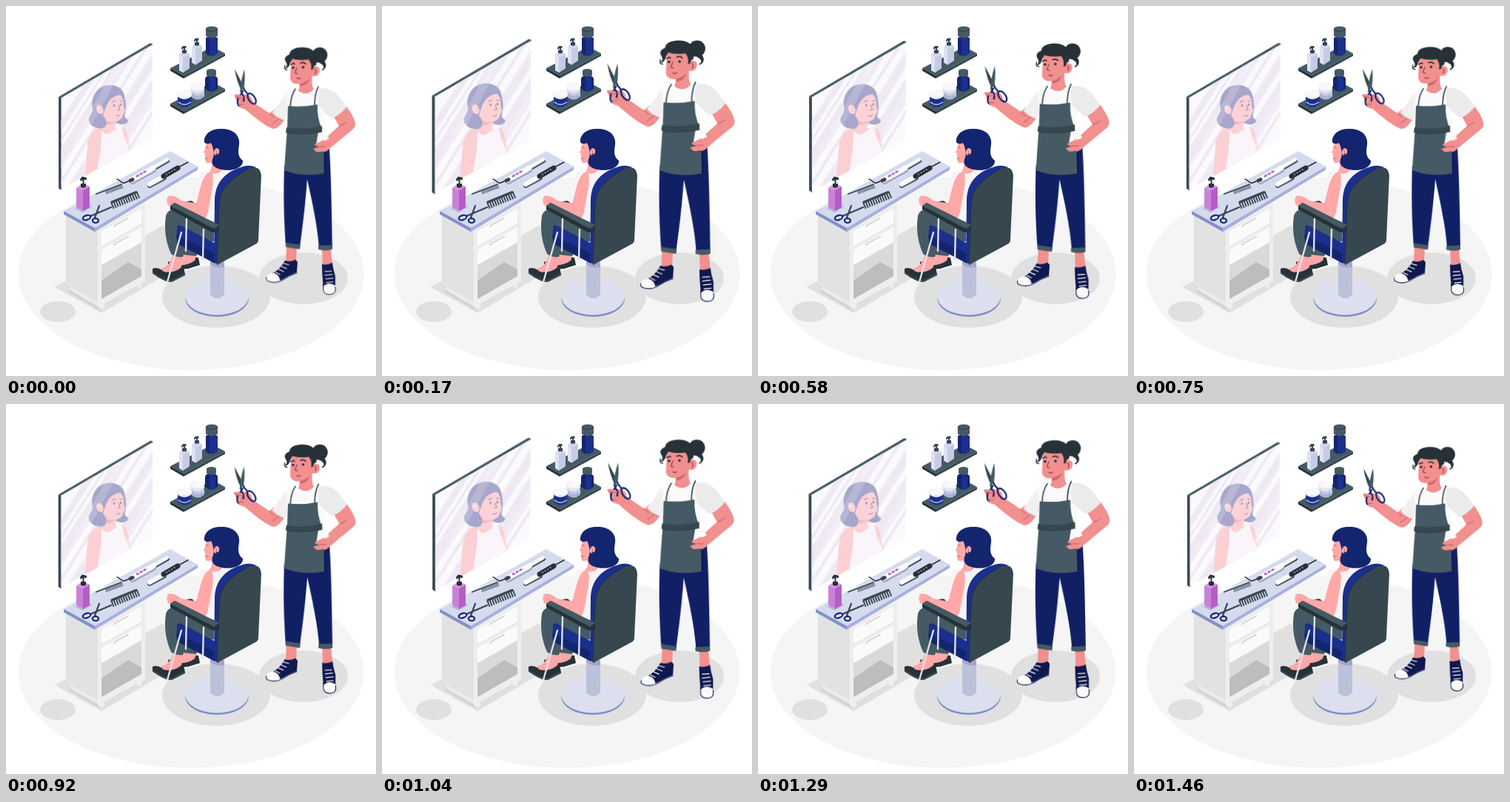
An HTML page that plays this animation: 500x500 px, repeating every 1.5 s.

```html
<!DOCTYPE html>
<html lang="en">
<head>
<meta charset="utf-8">
<title>Hair salon</title>
<style>
html, body { margin: 0; width: 100%; height: 100%; overflow: hidden; background: #fff; }
svg { display: block; width: 100vw; height: 100vh; }
.navy { fill: #14256f; }
.blue { fill: #1b2f8c; }
.slate { fill: #455a64; }
.dark { fill: #37474f; }
.ink { fill: #263238; }
.skin { fill: #f28f8f; }
.rose { fill: #ffa8a7; }
.shade { fill: #e0e0e0; }
.white { fill: #fafafa; }
.line { fill: none; stroke-linecap: round; stroke-linejoin: round; }
#stylist { transform-origin: 391px 222px; }
#mirror { transform-origin: 134.5px 149px; }
</style>
</head>
<body>
<svg viewBox="0 0 500 500">
  <defs>
    <clipPath id="glass"><path d="M74.500 124L198 52V179L74.500 248Z"/></clipPath>
    <g id="pump">
      <path d="M234 66L238 62H244L248 65V84L239 90L234 87Z" fill="#dfe2f3"/>
      <path d="M239 69L248 65V84L239 90Z" fill="#c5cae6"/>
      <path d="M234 66L238 62H244L248 65L239 69Z" fill="#d3d7ee"/>
      <path class="dark" d="M238 59.500H244V63.500Q241 65 238 63.500ZM240 56H242V60H240ZM237 56.500L239 54H243.500V57H240L237.500 59Z"/>
    </g>
    <g id="shelf">
      <path class="slate" d="M222 84L279 55L296 64L240 94Z"/>
      <path class="ink" d="M222 84L240 94V98L222 87.500Z"/>
      <path class="dark" d="M240 94L296 64V67.500L240 98Z"/>
    </g>
  </defs>

  <!-- floor and shadows -->
  <ellipse cx="250" cy="362" rx="233.500" ry="130" fill="#f5f5f5"/>
  <g class="shade">
    <ellipse cx="70" cy="413" rx="24" ry="14"/>
    <ellipse cx="284" cy="393" rx="73" ry="42"/>
    <ellipse cx="402" cy="368" rx="60" ry="35"/>
    <path d="M66 380L211 297L268 332L129 415Z"/>
  </g>

  <!-- shelves -->
  <use href="#shelf"/>
  <use href="#pump"/>
  <use href="#pump" x="17" y="-10.500"/>
  <path class="blue" d="M270 43Q278 38 286 43V64Q278 71 270 64Z"/>
  <path class="navy" d="M270 43V64Q272 67 275 67.500V43Z"/>
  <path class="slate" d="M270 31Q270 27.500 278 27.500T286 31V40.500Q278 46 270 40.500Z"/>
  <path class="line" d="M270 32Q278 37 286 32" stroke="#263238" stroke-width=".8"/>
  <use href="#shelf" y="48"/>
  <path class="navy" d="M269 98Q270 94 277.500 93Q285 94 286 98V112Q277.500 119 269 112Z"/>
  <path class="blue" d="M275 96H283V114Q279 116.500 275 115.500Z"/>
  <path class="slate" d="M271 88Q271 85 277.500 85T284 88V93.500Q277.500 98 271 93.500Z"/>
  <path d="M250 115H268V122Q259 131 250 122Z" fill="#c5cae6"/>
  <path class="line" d="M251 121Q259 127 267 121" stroke="#7c87bd" stroke-width="5" stroke-dasharray=".8 1.700" style="stroke-linecap:butt"/>
  <path d="M249 109Q249 104 258.500 104T268 109V114Q258.500 122 249 114Z" fill="#e6e6ea"/>
  <ellipse cx="258.500" cy="109" rx="9.500" ry="5" fill="#f8f8fa"/>
  <path class="blue" d="M232 122H250.500V132Q241 141 232 132Z"/>
  <path class="line" d="M233 130Q241 136.500 249.500 130" stroke="#c5cae6" stroke-width="1.500"/>
  <path d="M231 118.500Q231 113.500 241 113.500T251 118.500V122Q241 130 231 122Z" fill="#e6e6ea"/>
  <ellipse cx="241" cy="118.500" rx="10" ry="5" fill="#f8f8fa"/>

  <!-- mirror -->
  <g id="mirror">
    <path class="dark" d="M71 122.500L75 125V249L71 246.500Z"/>
    <path class="slate" d="M71 122.500L195 50L198 51V53L75 125Z"/>
    <g clip-path="url(#glass)">
      <path d="M70 120L198 46V185L70 252Z" fill="#faf9fb"/>
      <g id="rays" stroke="#efe9f4"></g>
      <path d="M126 164C116 169 111 178 110 190L106 240L128 236L131 176L157 163C164 168 166 177 167 195L162 207L154 207L150 165Z" fill="#fccfd2"/>
      <path d="M129 167L133 172C140 176 148 170 152 162L157 164C158 174 162 184 166 192L167 207L122 235C124 210 130 195 129 167Z" fill="#f9f5fa"/>
      <path d="M118 142Q115 123 125 113C137 103 156 107 160 121Q164 136 160 150L164 154Q164 160 155 160L149 157L124 163Z" fill="#a7a6cb"/>
      <path d="M129 138L132 166C138 173 147 169 148 161L149 157Q156 156 158 148L161 142L159 135Q160 124 153 119Q142 121 135 134Z" fill="#fbd3d6"/>
      <path d="M132 148C134 159 143 157 149 156C141 161 136 162 132 158Z" fill="#f5b7bf"/>
      <path d="M155 120C144 121 139 127 135 136L131 148C136 153 137 161 133 164C126 168 112 163 112 154C111 149 118 145 117 138C114 124 122 108 138 107C150 106 159 112 160 122Q158 119 155 120Z" fill="#a7a6cb"/>
      <path d="M148 157Q157 153 160 148Q161 152 165 154Q165 160 156 160Q151 160 148 157Z" fill="#a7a6cb"/>
      <ellipse cx="127" cy="140" rx="4.500" ry="6.500" fill="#fbd3d6" transform="rotate(-22 127 140)"/>
      <path class="line" d="M143 130L148 128M154 128L157 129M152 134L154 140L151 141M149 148Q152 150 154 147" stroke="#a08bae" stroke-width="1"/>
      <path d="M145 133h2v3h-2zM154 132h2v3h-2z" fill="#8d8fbd"/>
      <path d="M75 214L150 75H162L78 231ZM141 218L201 106V128L156 211Z" fill="#fff" opacity=".18"/>
    </g>
  </g>

  <!-- dressing table -->
  <path d="M81 276L125 300V402L81 376Z" fill="#e2e2e2"/>
  <path d="M85 379L89 381V386L128 408V412L85 387Z" fill="#d2d2d2"/>
  <path d="M86 379L128 402V408L86 384Z" fill="#ebebeb"/>
  <path d="M124 302L188 264V372L183 375V380L178 382V377L133 402V408L128 410L124 406Z" fill="#efefef"/>
  <path d="M129 349L183 318V365L129 396Z" fill="#d9d9d9"/>
  <path d="M129 371L165 346L183 356V365L129 396Z" fill="#bdbdbd"/>
  <g id="drawer">
    <path d="M128 304L184 272V294L128 326Z" fill="#fafafa" stroke="#e2e2e2"/>
    <path class="line" d="M146 298L147 296.500L163 287.500L165 287" stroke="#d3d3d3" stroke-width="2"/>
  </g>
  <use href="#drawer" y="25"/>
  <path d="M78 277L222 196L259 217L120 300Z" fill="#d6daed"/>
  <path d="M78 277L120 300V305L78 281.500Z" fill="#8291cc"/>
  <path d="M120 300L259 217V221.500L120 305Z" fill="#a5b0df"/>

  <!-- table tools -->
  <path d="M93 274L108 267L117 271L104 279Z" fill="#b7bdd9"/>
  <path d="M95 246L103 240L113 244V272L104 277L95 272Z" fill="#c982d6"/>
  <path d="M104 249L113 244V272L104 277Z" fill="#b75dc9"/>
  <path d="M95 246L103 240L113 244L104 249Z" fill="#d79ae0"/>
  <path class="ink" d="M101 240H108V244.500Q104.500 247 101 244.500ZM103.500 234H105.500V241H103.500ZM100 234L103 230.500L109 232V235L104 234.500L101 237Z"/>
  <g class="line">
    <path d="M114 284L142 272M120 286L126 270" stroke="#37474f" stroke-width="2.200"/>
    <ellipse cx="109" cy="286" rx="5.500" ry="3" stroke="#14256f" stroke-width="2.200" transform="rotate(-18 109 286)"/>
    <ellipse cx="121" cy="290" rx="4" ry="3" stroke="#14256f" stroke-width="2.200"/>
    <path d="M122 254L156 241" stroke="#37474f" stroke-width="1.800"/>
    <path d="M135 252L158 243.500" stroke="#455a64" stroke-width="5" stroke-dasharray="1.200 1" style="stroke-linecap:butt"/>
    <path d="M143 265L176 251.500" stroke="#37474f" stroke-width="3"/>
    <path d="M143 270L180 255" stroke="#37474f" stroke-width="9" stroke-dasharray="1.900 1.500" style="stroke-linecap:butt"/>
    <path d="M150 234C154 234 155 240 160 239C164 238 165 236 170 236" stroke="#263238" stroke-width="1.600"/>
    <path d="M171 237.500L199 222" stroke="#9aa1c2" stroke-width="7"/>
    <path d="M199 221L219 209.500" stroke="#455a64" stroke-width="4.500"/>
    <path d="M170 235L199 219" stroke="#fafafa" stroke-width="7.500"/>
    <path d="M199 218.500L218 207.500" stroke="#fafafa" stroke-width="4.500"/>
    <path d="M177 230L190 222.500" stroke="#b75dc9" stroke-width="2.600" stroke-dasharray="2 3.500"/>
    <path d="M168 236L171 234.500" stroke="#37474f" stroke-width="5"/>
    <path d="M194 243L214 232.500" stroke="#455a64" stroke-width="6"/>
    <path d="M194 241L214 230" stroke="#fafafa" stroke-width="6"/>
    <path d="M213 230L232 219" stroke="#263238" stroke-width="7"/>
    <path d="M217 227.500L228 221" stroke="#d8dcee" stroke-width="1.600" stroke-dasharray=".1 4"/>
    <path d="M233 218L246 211" stroke="#263238" stroke-width="1.600"/>
  </g>

  <!-- chair base -->
  <ellipse cx="285" cy="395" rx="43" ry="25" fill="#7f8dc8"/>
  <ellipse cx="285" cy="392.500" rx="43" ry="25" fill="#dcdfee"/>
  <path d="M276 340H295V390Q285.500 400 276 390Z" fill="#bcc1da"/>
  <path d="M276 344L295 347V353Q285 355 276 349Z" fill="#a0a7c9"/>

  <!-- client and chair -->
  <path class="ink" d="M219 346Q225 343 232 348Q241 349 247 343Q253 338 260 340L262 350L246 355Q229 357 219 350Z"/>
  <path class="rose" d="M229 347Q238 344 241 333L258 335L255 344Q246 351 233 350Z"/>
  <path class="ink" d="M198 355Q204 352 211 357Q221 361 228 354Q235 349 240 352L242 363L224 372Q216 374 209 367L198 360Z"/>
  <path class="rose" d="M209 355Q221 352 226 337L240 338L237 353Q227 362 213 359Z"/>
  <path class="dark" d="M198 359L211 367Q218 371 224 370L242 361V364L224 373Q215 374 198 361.500Z"/>
  <path class="dark" d="M222 269L250 263L275 276L270 294L240 290Z"/>
  <path d="M262 226Q270 221 282 222L309 219L287 295L250 280Z" fill="#f7f4f6"/>
  <path class="slate" d="M216 284Q218 274 232 274L281 292V318L256 324Q260 333 257 338L240 336L239 339Q229 340 223 335C217 321 213 304 216 284Z"/>
  <path class="blue" d="M231 298Q232 295 237 297L283 321V348L235 323Q230 320 230 315Z"/>
  <path class="navy" d="M230 309L283 335V348L235 323Q230 320 230 315Z"/>
  <path class="slate" d="M217 283Q220 276 234 275L270 292L268 303L238 293Q230 292 231 302Q229 316 233 326L222 322Q215 305 217 283Z"/>
  <path class="blue" d="M281 345L282 262C283 238 296 224 320 217Q329 214 338 218L291 255L287 350Z"/>
  <path class="dark" d="M285 350L288 268C290 246 302 235 325 222Q343 212 345 229L341 316Q341 320 337 322Z"/>
  <path class="line" d="M285 348L288 268C290 246 302 235 325 222" stroke="#263238" stroke-width="1"/>
  <path class="rose" d="M279 207L292 216Q293 224 286 226Q279 228 275 224Q280 217 277 211Z"/>
  <path class="rose" d="M277 224C269 225 265 236 262 248L257 267L237 263Q226 254 219 257Q216 262 219 269L225 271L255 286C266 292 271 288 273 278L279 246Q281 227 277 224Z"/>
  <path class="line" d="M258 267L254 266M223 264L231 268" stroke="#e98080" stroke-width=".8"/>
  <path class="rose" d="M271 184Q270 192 267 198L269 200Q268 209 271 212Q277 213 284 209L290 195L285 181Z"/>
  <path class="navy" d="M268 184C267 172 279 165 292 166C308 166 317 176 315 188C313 199 314 204 320 209C321 219 305 224 291 221C281 219 277 214 279 207Q282 202 280 194Q279 188 277 185Q271 188 268 184Z"/>
  <ellipse class="rose" cx="284.500" cy="197" rx="3.600" ry="5" transform="rotate(15 284.500 197)"/>
  <path class="line" d="M283 195Q286 196 284 200M270 191L273 191M270 206L273 206" stroke="#a94c5f" stroke-width=".8"/>
  <circle cx="285" cy="201" r="1.200" class="ink"/>
  <path class="ink" d="M222 270L228 266L288 296V303Q283 308 277 305L222 275Z"/>
  <path class="slate" d="M222 270L228 266L288 296L281 301Z"/>
  <path class="line" d="M244 288L243 331M267 302L266 343M237 306L218 373" stroke="#dfe1e9" stroke-width="2.400"/>

  <!-- stylist -->
  <g id="stylist">
    <path class="skin" d="M379 323L393 326L392 346L378 352ZM427 327L439 328L441 350L428 352Z"/>
    <path d="M377 344Q384 347 391 343L394 346L393 360Q382 364 373 370Q364 374 356 371L359 362Q370 357 377 344ZM427 349Q434 351 441 347Q442 356 445 365V381Q437 385 429 381Q427 363 427 349Z" fill="#10194f"/>
    <path class="white" d="M352 366Q355 361 362 361Q371 365 370 372Q358 376 352 371ZM429 379Q436 372 445 378Q447 388 440 390Q430 391 429 385Z"/>
    <path class="line" d="M352 367Q351 371 354 372Q363 376 373 371Q383 364 393 361M428.500 376L429 385Q431 391 439 390T445 380" stroke="#10194f" stroke-width="1"/>
    <path class="line" d="M364 360L370 363M368 356L375 359M372 352L379 355M375 348L382 350M431 359L440 358.500M431 364L441 363M432 369L442 368M433 374L442 373" stroke="#fff" stroke-width="1.100"/>

    <path d="M376 216L420 190L437 192C439 222 440 260 441 327L423 327C421 297 414 266 407 234C405 262 402 290 397 326L378 324C375 280 375 250 376 216Z" fill="#112065"/>
    <path class="slate" d="M378 320L398 323L397 329L378 326ZM422 324L441 323V329Q431 332 422 329Z"/>
    <path class="line" d="M431 200V226" stroke="#0a154d" stroke-width="1"/>

    <path class="skin" d="M441 146L458 133Q470 148 472 158Q473 164 467 168L438 192Q432 200 419 197L415 193L424 190Q416 189 417 186L429 181L450 162Z"/>
    <path class="line" d="M451 162Q457 160 460 157M424 191L432 190" stroke="#b95563" stroke-width=".9"/>
    <path class="skin" d="M328 126L356 145L363 139L378 151Q369 166 361 166Q348 162 319 136Z"/>
    <path class="line" d="M356 145L362 151M360 159L369 152" stroke="#b95563" stroke-width=".9"/>
    <path class="white" d="M397 108Q383 111 376 119L360 144Q366 151 376 154L380 148V172L427 179L430 142L440 152L460 136Q447 114 430 111Z"/>
    <path d="M424 111Q439 110 448 120Q456 129 460 137Q451 148 440 152L424 137Q419 122 424 111Z" fill="#ebebeb"/>
    <path d="M360 144L379 118L380 147L376 154Q366 151 360 144Z" fill="#f0f0f0"/>

    <path class="skin" d="M396 100L414 91Q412 107 416 112Q406 123 395 114Q398 107 396 100Z"/>
    <path d="M397 104Q406 103 410 96Q409 107 397 108Z" fill="#cf6570"/>
    <path class="line" d="M384 137Q385 120 391 112M417 135Q417 119 422 109" stroke="#455a64" stroke-width="1.800"/>
    <path class="slate" d="M381 135Q401 137 421 133Q420 151 427 166Q430 196 430 226Q401 232 376 222Q378 190 380 166Z"/>
    <path class="white" d="M422 170L428 167L437 179L419 188Z"/>
    <path class="dark" d="M379 164Q402 168 427 162V170Q403 175 378 171Z"/>
    <path class="line" d="M380 172Q402 175 427 170" stroke="#2c3b42" stroke-width=".8"/>
    <path class="skin" d="M417 187L429 181L440 187Q433 199 419 197L415 193L424 190Q418 190 417 187Z"/>
    <path class="line" d="M424 190L432 190" stroke="#b95563" stroke-width=".9"/>

    <circle class="ink" cx="424" cy="66" r="10.500"/>
    <path class="ink" d="M428 72Q437 80 428 87Q432 80 424 77Z"/>
    <path class="skin" d="M386 70Q384 84 384 98Q386 106 396 105Q407 103 413 94Q422 97 424 87Q424 81 417 81L411 68Z"/>
    <path class="ink" d="M376 84Q382 81 378 75Q374 69 383 65C383 57 397 54 406 56C418 58 422 68 419 80Q416 79 415 85L412 86Q414 78 409 72Q396 74 387 71Q384 76 383 80Q380 85 376 84Z"/>
    <path class="line" d="M377 80Q375 86 380 86M430 77Q434 82 427 86" stroke="#263238" stroke-width="1.300"/>
    <path class="line" d="M385 79Q388 76 390 78M398 77Q402 75 405 78" stroke="#263238" stroke-width="1.600"/>
    <circle class="ink" cx="388" cy="83" r="1.700"/>
    <circle class="ink" cx="401.500" cy="82.500" r="1.700"/>
    <path class="line" d="M393 83L390.500 90L394 91M393 97Q395 99 398 97M417 85Q420 86 418 91" stroke="#8f3a4a" stroke-width="1.100"/>

    <path class="skin" d="M308 120Q312 118 317 121L325 119Q333 121 333 132L326 139Q315 140 313 131Z"/>
    <path class="dark" d="M309 85L323 112L319 116Q311 101 309 85Z"/>
    <path class="slate" d="M322 85Q324 101 320 118L316 116Q317 100 322 85Z"/>
    <g class="line" stroke="#14256f" stroke-width="2.200">
      <ellipse cx="317" cy="127" rx="4" ry="8" transform="rotate(13 317 127)"/>
      <ellipse cx="332" cy="125" rx="4.200" ry="8" transform="rotate(-35 332 125)"/>
      <path d="M318 118L321 112L326 118"/>
    </g>
    <circle cx="320" cy="113" r="1" fill="#d8dcee"/>
    <path class="skin" d="M308 120Q316 118 321 123Q320 126 314 124ZM314 130Q319 127 324 131L328 137Q320 140 315 135Z"/>
    <path class="line" d="M310 122L319 124M315 133L321 133" stroke="#b95563" stroke-width=".8"/>
  </g>
</svg>
<script>
// slanted reflections: [x where the ray meets y = 150, width]
const rays = [[82, 8], [94, 3], [110, 15], [130, 4], [150, 11], [176, 18], [194, 4]];
document.getElementById('rays').innerHTML = rays.map(([x, w]) =>
  `<path d="M${x - 70} 260L${x + 70} 40" stroke-width="${w}"/>`).join('');

// uneven double pulse; shapes are drawn at a scale of REST
const REST = 1.016;
const pulse = [[0, 1], [.2, 1.1], [.6, 1], [.8, 1.1], [1, 1]].map(([offset, s]) =>
  ({ offset, transform: `scale(${s / REST})` }));

for (const id of ['mirror', 'stylist'])
  document.getElementById(id).animate(pulse, { duration: 1500, delay: -42, iterations: Infinity });
</script>
</body>
</html>
```
